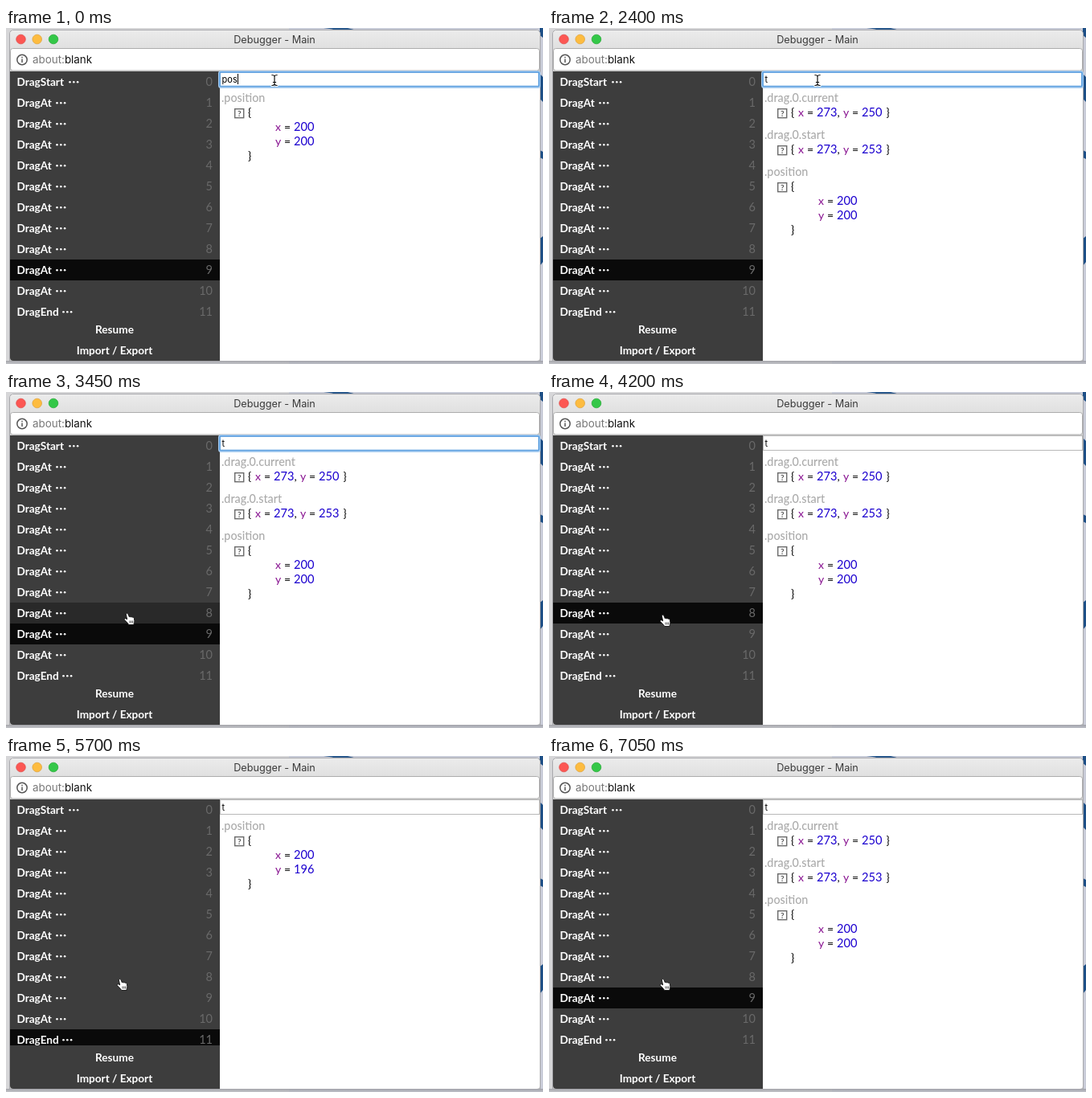
Write an HTML page that moves like this. It is 668x418 px and loops after 8000 ms.

```html
<!DOCTYPE html>
<html lang="en">
<head>
<meta charset="utf-8">
<title>Debugger</title>
<style>
html, body { margin: 0; width: 100%; height: 100%; overflow: hidden; background: #d9dae0; }
svg { display: block; width: 668px; height: 418px; }
text { font-family: Lato, "Open Sans", sans-serif; font-size: 14px; white-space: pre; }
.ui { font-family: Inter, Roboto, sans-serif; }
.title { font-size: 12.7px; fill: #3b3b3b; text-anchor: middle; }
.url { font-size: 13.4px; }
.query { font-size: 11px; }
.msg { font-size: 13.6px; font-weight: 700; fill: #fff; }
.mid { text-anchor: middle; }
.index { font-size: 14.5px; fill: #696969; text-anchor: end; }
.path { font-size: 14.3px; fill: #aaa; font-weight: 500; }
.key { fill: #881391; }
.num { font-size: 14.6px; fill: #1c00cf; }
.mark { font-size: 10px; font-weight: 700; fill: #555; text-anchor: middle; }
</style>
</head>
<body>
<svg viewBox="0 0 668 418">
  <defs>
    <linearGradient id="bar" x2="0" y2="1">
      <stop offset="0" stop-color="#ebebeb"/><stop offset="1" stop-color="#d2d2d2"/>
    </linearGradient>
    <linearGradient id="shade" x2="0" y2="1">
      <stop offset="0" stop-color="#8f9096"/><stop offset="1" stop-color="#b9bac0"/>
    </linearGradient>
    <clipPath id="list"><rect x="5" y="54" width="261" height="306"/></clipPath>
  </defs>
  <rect width="668" height="418" fill="#d6d6d8"/>
  <rect x="352" width="316" height="418" fill="#c9ccd8"/>
  <path d="M395 0q12 1 18 4h26q-9-3-14-4z" fill="#2b5a8d"/>
  <path d="M664 0h4v12l-4-3zM664 57l4 4v31l-4-4zM664 152l4 2v9l-4-2zM664 262l4-3v32l-4 5z" fill="#1d4f86"/>
  <rect y="414" width="668" height="4" fill="url(#shade)" opacity=".7"/>
  <path d="M4.5 414V8q0-5.500 5.500-5.500h649q5.500 0 5.500 5.500v406z" fill="url(#bar)" stroke="#a9a9ad"/>
  <path d="M5 54V8q0-5 5-5h649q5 0 5 5v46z" fill="url(#bar)"/>
  <circle cx="18.500" cy="14" r="5.800" fill="#fc5753" stroke="#df4744" stroke-width=".7"/>
  <circle cx="38.700" cy="14" r="5.800" fill="#fdbc40" stroke="#de9f34" stroke-width=".7"/>
  <circle cx="59" cy="14" r="5.800" fill="#34c748" stroke="#27aa35" stroke-width=".7"/>
  <text class="ui title" x="334" y="19">Debugger - Main</text>
  <rect x="5.500" y="25.500" width="658" height="27.500" rx="3" fill="#fff" stroke="#adadad"/>
  <circle cx="20" cy="39.500" r="6.200" fill="none" stroke="#555" stroke-width="1.500"/>
  <path d="M20 38.500v4.500M20 35.700v1.600" stroke="#555" stroke-width="1.500"/>
  <text class="ui url" x="33" y="44"><tspan fill="#777">about:</tspan><tspan fill="#111">blank</tspan></text>
  <path d="M5 54h659v356q0 4-4 4H9q-4 0-4-4z" fill="#fff"/>
  <path d="M5 54h261v360H9q-4 0-4-4z" fill="#3d3d3d"/>
  <g id="scene"></g>
</svg>
<script>
const LOOP = 8000;
const scene = document.getElementById('scene');

// Each step lists only what differs from the step before it.
const steps = [
  [0, { query: 'pos', caret: 288, focus: true, view: 'position', pick: 9, hover: -1,
        dragY: 250, posY: 200, cursor: 'beam', at: [334, 65] }],
  [150, { caret: 0 }],
  [450, { query: 'po', caret: 282 }],
  [600, { query: 'p', caret: 275 }],
  [750, { query: '', caret: 269 }],
  [900, { view: 'tree' }],
  [1350, { caret: 0 }],
  [1800, { caret: 269 }],
  [1950, { query: 't', caret: 273, view: 'matches' }],
  [2400, { caret: 0 }],
  [2850, { caret: 273 }],
  [3000, { cursor: 'arrow', at: [321, 111] }],
  [3150, { cursor: 'hand', at: [210, 220], hover: 5 }],
  [3300, { at: [176, 247], hover: 7 }],
  [3450, { at: [146, 274], hover: 8, caret: 0 }],
  [3600, { at: [137, 276] }],
  [3900, { caret: 273 }],
  [4050, { caret: 0, focus: false }],
  [4200, { pick: 8 }],
  [4800, { pick: 9 }],
  [5250, { pick: 10, hover: -1, dragY: 249 }],
  [5700, { pick: 11, view: 'position', posY: 196 }],
  [6600, { pick: 10, view: 'matches', posY: 200 }],
  [7050, { pick: 9, dragY: 250 }]
];

const text = (x, y, s, cls = '') => `<text x="${x}" y="${y}" class="${cls}">${s}</text>`;
const rect = (x, y, w, h, fill) => `<rect x="${x}" y="${y}" width="${w}" height="${h}" fill="${fill}"/>`;

const toggle = (x, y) =>
  `<rect x="${x + .7}" y="${y - 9.3}" width="11" height="11" fill="#fff" stroke="#6a6a6a" stroke-width="1.4"/>` +
  text(x + 6.2, y - .2, '?', 'mark');

const field = (x, y, key, value) =>
  text(x, y, key, 'key') + text(x + 11, y, '=') + text(x + 23, y, value, 'num');

const point = (x, y, py) =>
  text(x, y, '{') + field(x + 9, y, 'x', 273) + text(x + 57.5, y, ',') +
  field(x + 65, y, 'y', py) + text(x + 118.5, y, '}');

const position = (y, py) =>
  text(268, y, '.position', 'path') + toggle(284, y + 18) + text(301, y + 18, '{') +
  field(335, y + 36, 'x', 200) + field(335, y + 54, 'y', py) + text(301, y + 72, '}');

const match = (y, path, py) => text(268, y, path, 'path') + toggle(284, y + 18) + point(301, y + 18, py);

const views = {
  position: s => position(92, s.posY),
  matches: s => match(92, '.drag.0.current', s.dragY) + match(138, '.drag.0.start', 253) + position(184, s.posY),
  tree: s =>
    toggle(284, 92) + text(301, 92, '{') +
    toggle(319, 110) + text(335, 110, 'drag', 'key') + text(366.5, 110, '=') + text(379, 110, 'Just {current,start}') +
    toggle(354, 128) + text(370, 128, 'current', 'key') + text(418.5, 128, '=') + point(431, 128, s.dragY) +
    toggle(354, 146) + text(370, 146, 'start', 'key') + text(402, 146, '=') + point(414.5, 146, 253) +
    toggle(319, 164) + text(335, 164, 'position', 'key') + text(389.5, 164, '=') + text(401.5, 164, '{') +
    field(370, 182, 'x', 200) + field(370, 200, 'y', s.posY) +
    text(336, 218, '}') + text(301, 236, '}')
};

function message(i, s) {
  const top = 54 + 26 * i;
  const name = i === 0 ? 'DragStart' : i === 11 ? 'DragEnd' : 'DragAt';
  const dots = { DragStart: 79.5, DragEnd: 71.5, DragAt: 63.5 }[name];
  const fill = i === s.pick ? '#0a0a0a' : i === s.hover ? '#292929' : '';
  return (fill && rect(5, top, 261, 26, fill)) + text(13.5, top + 18, name, 'msg') +
    [0, 1, 2].map(k => `<circle cx="${dots + k * 4.8}" cy="${top + 13.3}" r="1.3" fill="#fff"/>`).join('') +
    text(257, top + 18, i, 'index');
}

function sidebar(s) {
  const rows = Array.from({ length: 12 }, (_, i) => message(i, s)).join('');
  return `<g clip-path="url(#list)">${rows}</g>` +
    text(135, 380, 'Resume', 'msg mid') + text(135, 406, 'Import / Export', 'msg mid');
}

function search(s) {
  const box = (x, y, w, h, r, attrs) => `<rect x="${x}" y="${y}" width="${w}" height="${h}" rx="${r}" fill="none" ${attrs}/>`;
  const edge = s.focus
    ? box(265.5, 54.5, 398, 19, 2, 'stroke="#a9cdf0" stroke-width="3"') +
      box(266, 55, 397, 17.5, 1, 'stroke="#5b9fdf" stroke-width="1.6"')
    : box(266.5, 54.5, 397, 18, 0, 'stroke="#b8b8b8"');
  return edge + text(268.6, 68, s.query, 'ui query') + (s.caret ? rect(s.caret, 57, 1, 13, '#000') : '');
}

const cursors = {
  beam: `<g fill="none" stroke-linecap="square">
    <path id="b" d="M-3-6.500q2.500 0 3 1.500q.5-1.500 3-1.500M0-5V5M-3 6.500q2.500 0 3-1.500q.5 1.500 3 1.500M-1.500 2.500h3" stroke="#fff" stroke-width="2.600"/>
    <use href="#b"/><path d="M-3-6.500q2.500 0 3 1.500q.5-1.500 3-1.500M0-5V5M-3 6.500q2.500 0 3-1.500q.5 1.500 3 1.500M-1.500 2.500h3" stroke="#111" stroke-width="1.200"/></g>`,
  arrow: '<path d="M0 0v14l3.200-3 2.400 5.500 2.400-1-2.400-5.300h4.600z" fill="#000" stroke="#fff"/>',
  hand: `<path d="M3.200 2q1.700-1.600 2.800.5l1.300 3.300q1-.9 2 .2q1.200-.8 2 .3q1.500-.4 2 1l.5 3.200q.2 1.800-.6 3.200l-.2 1.800H6.700q-1.200-2.200-3-3.700l-2.300-2.300q-.6-1.500 1-1.800l2.300 1.100z" fill="#fff" stroke="#111" stroke-width=".9" stroke-linejoin="round"/>
    <path d="M8 10.500v3M9.900 10.500v3M11.700 10.500v3" stroke="#222" stroke-width=".8"/>`
};

function draw(s) {
  scene.innerHTML = sidebar(s) + views[s.view](s) + search(s) +
    `<g transform="translate(${s.at})">${cursors[s.cursor]}</g>`;
}

const states = [];
steps.forEach(([, change], i) => states.push({ ...states[i - 1], ...change }));

let shown = -1;
function tick() {
  const t = performance.now() % LOOP;
  const now = steps.filter(([start]) => start <= t).length - 1;
  if (now !== shown) draw(states[shown = now]);
  requestAnimationFrame(tick);
}
tick();
</script>
</body>
</html>
```
